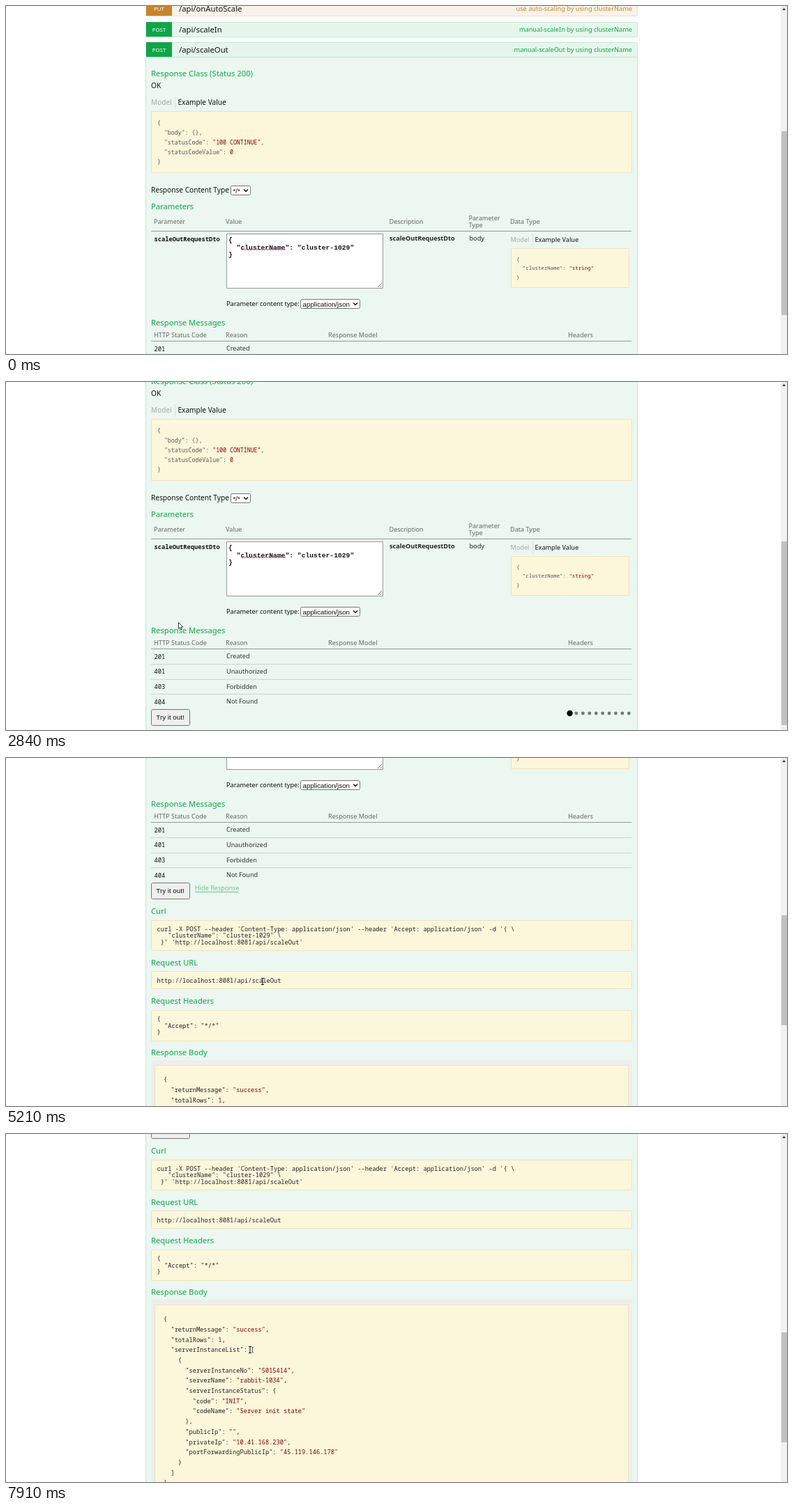
These frames come from a looping animation (1120x500 px, 7990 ms). An HTML page with a canvas:

```html
<!DOCTYPE html>
<html lang="en">
<head>
<meta charset="utf-8">
<title>API console</title>
<style>
  html, body { margin: 0; height: 100%; overflow: hidden; background: #fff; }
  canvas { display: block; }
</style>
</head>
<body>
<canvas id="stage" width="1120" height="500"></canvas>
<script>
const ctx = document.getElementById('stage').getContext('2d');
const LOOP = 7990, RESPONSE_AT = 4340, CLICK_AT = 1500;
const GREEN = '#10a54a', BROWN = '#c5862b', RED = '#a41e22';
const SANS = '"Noto Sans", sans-serif';
const MONO = '"Noto Sans Mono", monospace';
const TYPEWRITER = '"Liberation Mono", monospace';
const UI = '"Liberation Sans", sans-serif';

// [time, scroll offset]
const SCROLL = [[110, 0], [540, 71], [600, 71], [850, 98], [3550, 98], [3840, 143],
  [4400, 143], [5130, 389], [5210, 389], [5500, 585]];

// [time, x, y, is text cursor]
const POINTER = [[200, 1050, 385], [560, 900, 397], [890, 880, 403], [980, 870, 404],
  [1400, 240, 478], [1820, 236, 480], [2150, 197, 420], [2600, 240, 350], [2840, 247, 345],
  [3200, 300, 303], [3470, 345, 324], [3860, 350, 332], [4340, 356, 330], [5000, 368, 321, 1],
  [5230, 368, 321], [5500, 342, 319], [5980, 342, 319], [6180, 420, 262], [6400, 436, 380],
  [6640, 300, 480], [6820, 228, 440], [6960, 242, 440], [7150, 300, 470], [7400, 395, 390],
  [7680, 350, 312, 1], [7910, 350, 310, 1]];

const RESULT = `{
  "returnMessage": "success",
  "totalRows": 1,
  "serverInstanceList": [
    {
      "serverInstanceNo": "5015414",
      "serverName": "rabbit-1034",
      "serverInstanceStatus": {
        "code": "INIT",
        "codeName": "Server init state"
      },
      "publicIp": "",
      "privateIp": "10.41.168.230",
      "portForwardingPublicIp": "45.119.146.178"
    }
  ]
}`;

function sample(keys, t) {
  const next = keys.findIndex(key => key[0] > t);
  if (next < 0) return keys[keys.length - 1].slice(1);
  if (next === 0) return keys[0].slice(1);
  const a = keys[next - 1], b = keys[next];
  const p = (t - a[0]) / (b[0] - a[0]), e = p * p * (3 - 2 * p);
  return a.slice(1).map((v, i) => v + ((b[i + 1] ?? v) - v) * e);
}

// y is the middle of the capitals
function text(str, x, y, size, color = '#111', family = SANS, weight = 400, align = 'left') {
  ctx.font = `${weight} ${size}px ${family}`;
  ctx.fillStyle = color;
  ctx.textAlign = align;
  ctx.fillText(str, x, Math.round(y + size * .36));
}

function rect(x, y, w, h, fill, stroke, radius = 0) {
  ctx.beginPath();
  ctx.roundRect(x + .5, y + .5, w - 1, h - 1, radius);
  ctx.fillStyle = fill;
  ctx.fill();
  if (!stroke) return;
  ctx.strokeStyle = stroke;
  ctx.lineWidth = 1;
  ctx.stroke();
}

function bar(x, y, w, h, color) {
  ctx.fillStyle = color;
  ctx.fillRect(x, y, w, h);
}

function path(points, color, width = 1) {
  ctx.beginPath();
  points.forEach(([x, y]) => ctx.lineTo(x, y));
  ctx.strokeStyle = color;
  ctx.lineWidth = width;
  ctx.stroke();
}

const heading = (str, y) => text(str, 208, y, 11.25, GREEN);
const note = (x, y, w, h) => rect(x, y, w, h, '#fcf6db', '#ebe3c0');
const label = (str, x, y) => text(str, x, y, 9.1, '#666');

function lines(str, x, y, pitch, size, color = '#222') {
  str.split('\n').forEach((line, i) => text(line, x, y + i * pitch, size, color, MONO));
}

function json(str, x, y, pitch, size, color) {
  str.split('\n').forEach((line, i) => {
    const [, key, value, rest] = line.match(/^(.*": )(".*"|\d+)(,?)$/) || [0, line, '', ''];
    let left = x;
    [[key, color], [value, '#800000'], [rest, color]].forEach(([part, shade]) => {
      text(part, left, y + i * pitch, size, shade, MONO);
      left += ctx.measureText(part).width;
    });
  });
}

function operation(y, method, name, summary, color, fill, border) {
  rect(200, y, 706, 22, fill, border, 2);
  bar(201, y, 37, 21, color);
  text(method, 219.5, y + 11.5, 7.8, '#fff', SANS, 400, 'center');
  text('/api/' + name, 248, y + 10.5, 11.25);
  text(summary + ' by using clusterName', 898, y + 10.5, 9.2, color, SANS, 400, 'right');
}

function tabs(x, y, size, split, second) {
  text('Model', x, y, size, '#aaa');
  bar(split, y - 8, 1, 18, '#ddd');
  text('Example Value', second, y, size);
}

function select(str, x, y, w, h) {
  rect(x, y, w, h, '#fff', '#767676', 2);
  text(str, x + 3.5, y + h / 2, 9.8, '#111', UI);
  const cx = x + w - 7, cy = y + h / 2;
  path([[cx - 3, cy - 1.5], [cx, cy + 1.5], [cx + 3, cy - 1.5]], '#111', 1.5);
}

function form() {
  heading('Response Class (Status 200)', 97);
  text('OK', 208, 114, 10.2);
  tabs(208, 138, 10.1, 242, 246.5);
  note(208, 151, 690, 89);
  json('{\n  "body": {},\n  "statusCode": "100 CONTINUE",\n  "statusCodeValue": 0\n}',
    217, 168, 14, 8.25, '#555');
  text('Response Content Type', 208, 264, 10.15);
  select('*/*', 322, 258, 29, 14);

  heading('Parameters', 287.5);
  label('Parameter', 212, 309.5);
  label('Value', 315, 309.5);
  label('Description', 549.5, 309.5);
  label('Parameter', 663.5, 305);
  label('Type', 663.5, 314.5);
  label('Data Type', 723, 309.5);
  bar(208, 323, 689, 1, '#999');
  text('scaleOutRequestDto', 212.5, 334.5, 8.73, '#111', MONO, 700);
  rect(316, 327, 225, 79, '#fff', '#999');
  ['{', '  "clusterName": "cluster-1029"', '}'].forEach((line, i) =>
    text(line, 319, 335.5 + i * 10.6, 9.7, '#112', TYPEWRITER, 700));
  path(Array.from({ length: 33 }, (_, i) => [337 + i * 2, 349.5 + i % 2]), '#d33', .9);
  path([[533, 404], [539, 398]], '#777');
  path([[536.5, 404], [539, 401.5]], '#777');
  text('scaleOutRequestDto', 550, 333.5, 9.15, '#222', SANS, 700);
  text('body', 664.5, 333.5, 9.15, '#222');
  tabs(723.5, 335.5, 9.15, 755, 758.5);
  note(724, 348, 170, 57);
  json('{\n  "clusterName": "string"\n}', 732, 363.5, 13, 7.4, '#555');
  text('Parameter content type:', 316, 427.5, 9.2);
  select('application/json', 422, 421, 86, 14);

  heading('Response Messages', 455);
  label('HTTP Status Code', 212, 472.5);
  label('Reason', 315, 472.5);
  label('Response Model', 462, 472.5);
  label('Headers', 806, 472.5);
  bar(208, 481, 689, 1, '#999');
  ['201 Created', '401 Unauthorized', '403 Forbidden', '404 Not Found'].forEach((row, i) => {
    const y = 492 + i * 21.7;
    text(row.slice(0, 3), 212.5, y + .5, 8.8, '#111', MONO);
    text(row.slice(4), 316, y, 9.1, '#333');
    if (i < 3) bar(208, Math.round(y + 11), 689, 1, '#ccd4cf');
  });
  rect(208, 568, 56, 24, '#efefef', '#767676', 2);
  text('Try it out!', 235.5, 579.5, 9.75, '#111', UI, 400, 'center');
}

function loader(t) {
  const active = Math.floor((t + 460) / 100) % 11;
  for (let i = 0; i < 10; i++) {
    ctx.beginPath();
    ctx.arc(808.5 + i * 9.42, 574, i === active ? 4.2 : 2.4, 0, 7);
    ctx.fillStyle = i === active ? '#000' : '#777';
    ctx.fill();
  }
}

function response() {
  text('Hide Response', 271, 576, 9.1, '#6cc38c');
  bar(271, 581, 63, 1, '#6cc38c');
  heading('Curl', 608.5);
  note(208, 622, 690, 44);
  lines(`curl -X POST --header 'Content-Type: application/json' --header 'Accept: application/json' -d '{ \\
   "clusterName": "cluster-1029" \\
 }' 'http://localhost:8081/api/scaleOut'`, 216.5, 634.5, 9.5, 8.73);
  heading('Request URL', 683);
  note(208, 695, 690, 26);
  lines('http://localhost:8081/api/scaleOut', 216.5, 708.5, 9.5, 8.73);
  heading('Request Headers', 738);
  note(208, 751, 690, 45);
  lines('{\n  "Accept": "*/*"\n}', 216.5, 764, 9.5, 8.73);
  heading('Response Body', 811.5);
  bar(208, 823, 690, 300, '#eeeeee');
  note(213, 830, 680, 290);
  json(RESULT, 226, 851, 14.7, 8.7, '#222');
}

function scrollbar(scroll, loaded) {
  bar(1111, 0, 9, 500, '#f1f1f1');
  const [top, size] = loaded ? [109 + scroll * .301, 158] : [180 + scroll * .497, 264];
  bar(1112, Math.round(top), 8, size, '#c1c1c1');
  ctx.beginPath();
  [[1113, 6], [1115.7, 2.5], [1118.4, 6]].forEach(([x, y]) => ctx.lineTo(x, y));
  ctx.fillStyle = '#505050';
  ctx.fill();
}

function pointer(t) {
  if (t < POINTER[0][0]) return;
  const [px, py, caret] = sample(POINTER, t);
  const beam = caret > .5 || (t >= 5000 && t < 5230) || t >= 7600;
  ctx.save();
  ctx.translate(Math.round(px), Math.round(py));
  if (beam) {
    path([[-2, -4.5], [2, -4.5]], '#111');
    path([[0, -4.5], [0, 4.5]], '#111');
    path([[-2, 4.5], [2, 4.5]], '#111');
  } else {
    ctx.beginPath();
    [[.5, .5], [.5, 9.5], [2.5, 7.6], [4, 10.8], [5.4, 10.2], [4, 7], [6.7, 7]]
      .forEach(([x, y]) => ctx.lineTo(x, y));
    ctx.closePath();
    ctx.fillStyle = '#fff';
    ctx.fill();
    ctx.strokeStyle = '#222';
    ctx.lineWidth = .9;
    ctx.stroke();
  }
  ctx.restore();
}

function draw(now) {
  const t = now % LOOP;
  const loaded = t >= RESPONSE_AT;
  const scroll = Math.round(sample(SCROLL, t)[0]);
  bar(0, 0, 1120, 500, '#fff');
  ctx.save();
  ctx.translate(0, -scroll);
  operation(-7, 'PUT', 'onAutoScale', 'use auto-scaling', BROWN, '#f9f2e9', '#f0e0ca');
  operation(23, 'POST', 'scaleIn', 'manual-scaleIn', GREEN, '#e7f6ec', '#c3e8d1');
  rect(200, 73, 706, loaded ? 1100 : 527, '#ebf7f0', '#c3e8d1', [0, 0, 4, 4]);
  operation(52, 'POST', 'scaleOut', 'manual-scaleOut', GREEN, '#e7f6ec', '#c3e8d1');
  form();
  if (loaded) {
    response();
  } else {
    if (t >= CLICK_AT) loader(t);
    operation(623, 'DELETE', 'terminateCluster', 'terminateCluster', RED, '#f5e8e8', '#e8c6c7');
  }
  ctx.restore();
  scrollbar(scroll, loaded);
  pointer(t);
  requestAnimationFrame(() => draw(performance.now()));
}
draw(0);
</script>
</body>
</html>
```
